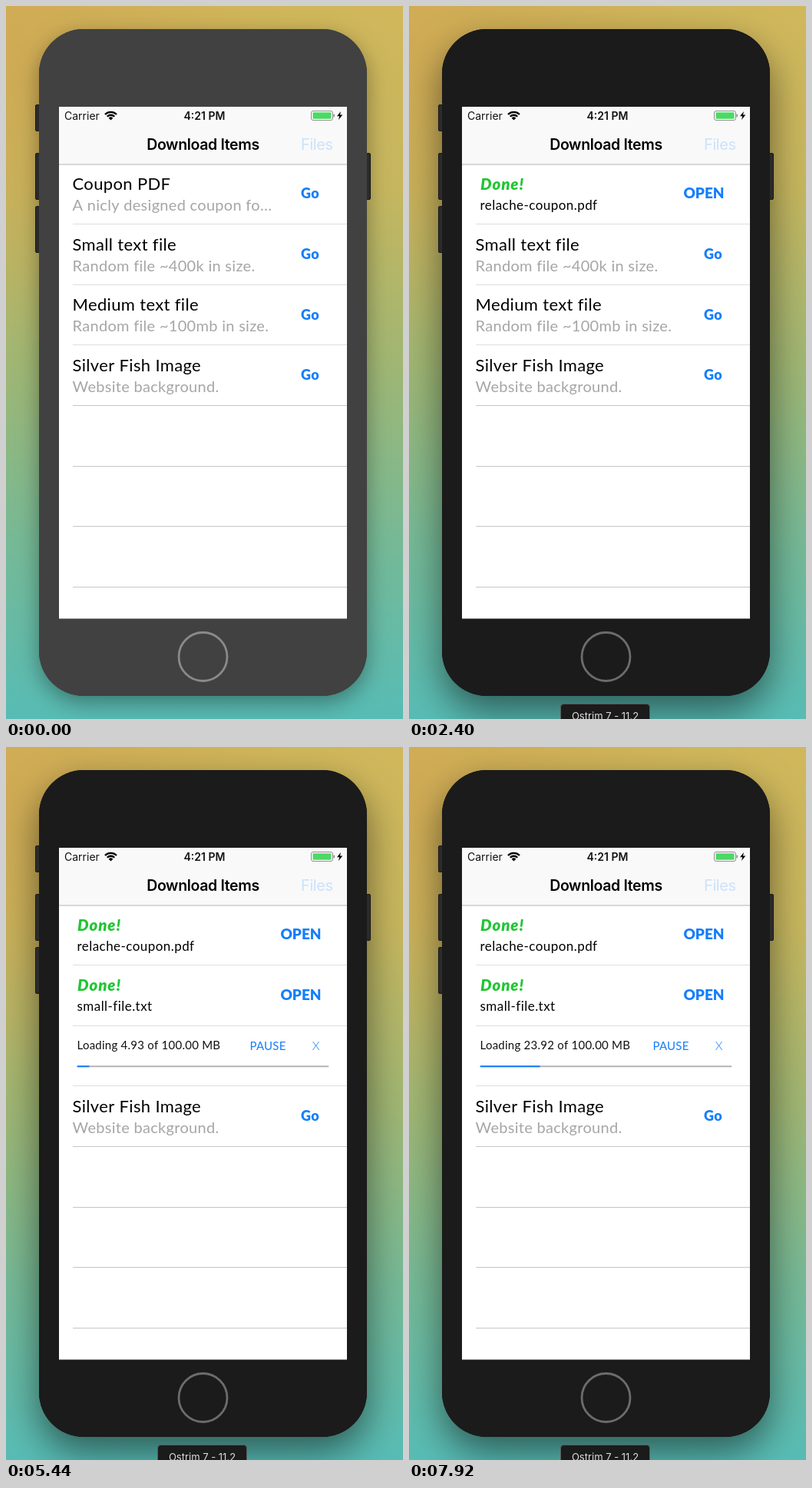
Recreate the animation shown at these times as an HTML page with a canvas. Size 517 px wide and 927 px high, loop 8000 ms.

```html
<!DOCTYPE html>
<html lang="en">
<head>
<meta charset="utf-8">
<title>Download Items</title>
<style>
  html, body { margin: 0; width: 100%; height: 100%; overflow: hidden; }
  canvas { display: block; width: 517px; height: 927px; }
</style>
</head>
<body>
<canvas id="stage" width="517" height="927"></canvas>
<script>
const W = 517, H = 927, LOOP = 8000, STEP = 80;
const ROW_H = 78.67;
const BLUE = '#157efb';
const LATO = 'Lato, "Open Sans", sans-serif';
const INTER = 'Inter, Roboto, sans-serif';
const ctx = document.getElementById('stage').getContext('2d');

// Times in ms; sizes in MB.
const rows = [
  { title: 'Coupon PDF', note: 'A nicly designed coupon fo…', file: 'relache-coupon.pdf',
    start: 1680, done: 2400, size: 1.24, loaded: t => 1.24 * Math.min(1, (t - 1680) / 320) },
  { title: 'Small text file', note: 'Random file ~400k in size.', file: 'small-file.txt',
    start: 2960, done: 3200, size: 0.4, loaded: t => 0.4 * Math.min(1, (t - 2960) / 160) },
  { title: 'Medium text file', note: 'Random file ~100mb in size.',
    start: 3920, done: Infinity, size: 100, loaded: mediumLoaded },
  { title: 'Silver Fish Image', note: 'Website background.', start: Infinity, done: Infinity }
];

// The download speeds up, following a power curve through three known amounts.
function mediumLoaded(t) {
  const s = t - 3920;
  const curve = (s0, v0, s1, v1) =>
    v0 * Math.pow(s / s0, Math.log(v1 / v0) / Math.log(s1 / s0));
  return s <= 2480 ? curve(800, 1.71, 2480, 11.05) : curve(2480, 11.05, 4000, 23.92);
}

function text(str, x, y, font, color, spacing = 0, align = 'left') {
  ctx.font = font;
  ctx.fillStyle = color;
  ctx.letterSpacing = spacing + 'px';
  ctx.textAlign = align;
  ctx.fillText(str, x, y);
}

function rect(x, y, w, h, color) {
  ctx.fillStyle = color;
  ctx.fillRect(x, y, w, h);
}

function rounded(x, y, w, h, r, fill, stroke) {
  ctx.beginPath();
  ctx.roundRect(x, y, w, h, r);
  if (fill) { ctx.fillStyle = fill; ctx.fill(); }
  if (stroke) { ctx.strokeStyle = stroke; ctx.lineWidth = 1; ctx.stroke(); }
}

function drawBackdrop() {
  const down = ctx.createLinearGradient(0, 0, 0, H);
  ['#d0b75b', '#c6b65e', '#a0b673', '#76b996', '#57bcb5']
    .forEach((c, i) => down.addColorStop(i / 4, c));
  rect(0, 0, W, H, down);
  const warm = ctx.createRadialGradient(0, 60, 0, 0, 60, 380);
  warm.addColorStop(0, 'rgba(208,160,78,0.55)');
  warm.addColorStop(1, 'rgba(208,160,78,0)');
  rect(0, 0, W, H, warm);
}

function drawPhone(active) {
  const body = active ? '#1b1b1b' : '#414141';
  ctx.save();
  ctx.shadowColor = active ? 'rgba(0,0,0,0.5)' : 'rgba(0,0,0,0.36)';
  ctx.shadowBlur = active ? 48 : 28;
  ctx.shadowOffsetY = active ? 20 : 9;
  rounded(43, 30, 427, 867, 58, body);
  ctx.restore();

  for (const [x, y, h] of [[38, 128, 35], [38, 191, 61], [38, 260, 61], [469, 191, 61]])
    rounded(x + 0.5, y + 0.5, 5, h - 1, 1.5, '#2b2b2b', '#191919');
  rounded(43, 30, 427, 867, 58, body);

  ctx.beginPath();
  ctx.arc(256.5, 846, 31.5, 0, Math.PI * 2);
  ctx.strokeStyle = active ? '#6c6c6c' : '#8a8a8a';
  ctx.lineWidth = 2.8;
  ctx.stroke();
}

function drawWifi() {
  const a = -Math.PI * 0.75, b = -Math.PI * 0.25;
  ctx.strokeStyle = ctx.fillStyle = '#000';
  ctx.lineWidth = 2.4;
  for (const r of [6.7, 10.6]) {
    ctx.beginPath();
    ctx.arc(136.5, 148.5, r, a, b);
    ctx.stroke();
  }
  ctx.beginPath();
  ctx.moveTo(136.5, 148.5);
  ctx.arc(136.5, 148.5, 4, a, b);
  ctx.fill();
}

function drawBattery() {
  rounded(397.5, 136.5, 28, 12, 2.5, '#fff', '#8e8e8e');
  rounded(399.5, 138.3, 24, 8.4, 1, '#4cd964');
  rounded(426.5, 140.5, 1.6, 4, 0.8, '#8e8e8e');
  ctx.beginPath();
  [[436, 137], [431, 143.2], [434.2, 143.2], [433, 148], [438.3, 141.5], [435, 141.5]]
    .forEach(([x, y]) => ctx.lineTo(x, y));
  ctx.fillStyle = '#000';
  ctx.fill();
}

function drawHeader() {
  rect(69, 131, 375, 665.5, '#fff');
  rect(69, 131, 375, 74.5, '#f9f9fa');
  rect(69, 205.5, 375, 1, '#b4b4b6');
  text('Carrier', 76, 148, `14px ${INTER}`, '#111');
  text('4:21 PM', 258.5, 148, `600 14px ${INTER}`, '#111', 0, 'center');
  drawWifi();
  drawBattery();
  text('Download Items', 256.5, 187, `600 19.5px ${INTER}`, '#000', -0.35, 'center');
  text('Files', 384, 187, `20px ${INTER}`, '#cbe2fa', -0.4);
}

function drawProgress(row, t, dy) {
  const mb = row.loaded(t);
  text(`Loading ${mb.toFixed(2)} of ${row.size.toFixed(2)} MB`,
    92.5, dy + 235.5, `15px ${LATO}`, '#111', 0.25);
  text('PAUSE', 317.5, dy + 237, `15px ${LATO}`, BLUE, 0.2);
  text('X', 403.5, dy + 237, `300 15.5px ${LATO}`, BLUE, 0, 'center');
  rounded(92.5, dy + 257, 328, 2, 1, '#b5b5b7');
  if (mb > 0) rounded(92.5, dy + 257, 328 * mb / row.size, 2, 1, BLUE);
}

function drawRow(row, i, t) {
  const dy = i * ROW_H;
  if (t >= row.done) {
    text('Done!', 93, dy + 238.8, `italic 900 20.5px ${LATO}`, '#22c534', 0.9);
    text(row.file, 92.5, dy + 264.8, `17px ${LATO}`, '#000', 0.45);
    text('OPEN', 384, dy + 250.3, `900 19px ${LATO}`, BLUE, 0, 'center');
  } else if (t >= row.start) {
    drawProgress(row, t, dy);
  } else {
    text(row.title, 86.5, dy + 239, `22px ${LATO}`, '#000', 0.35);
    text(row.note, 86.5, dy + 266, `20px ${LATO}`, '#a6a6a6', 0.3);
    text('Go', 396, dy + 250.3, `900 18px ${LATO}`, BLUE, 0.3, 'center');
  }
}

function drawLabel() {
  rounded(197.5, 907.5, 116, 30, 4, '#1b1b1b', '#5c5c5c');
  text('Ostrim 7 - 11.2', 255.5, 927.5, `13px ${INTER}`, '#dcdcdc', 0, 'center');
}

function draw(t) {
  drawBackdrop();
  drawPhone(t >= 1600);
  drawHeader();
  for (let i = 0; i < 7; i++)
    rect(87, Math.round(283 + i * ROW_H), 357, 1, i < 3 ? '#dedee0' : '#c6c6c8');
  rows.forEach((row, i) => drawRow(row, i, t));
  if (t >= 560) drawLabel();
}

let shown = -1;
function tick(now) {
  const step = Math.floor(now % LOOP / STEP);
  if (step !== shown) draw((shown = step) * STEP);
  requestAnimationFrame(tick);
}
draw(0);
requestAnimationFrame(tick);
</script>
</body>
</html>
```
